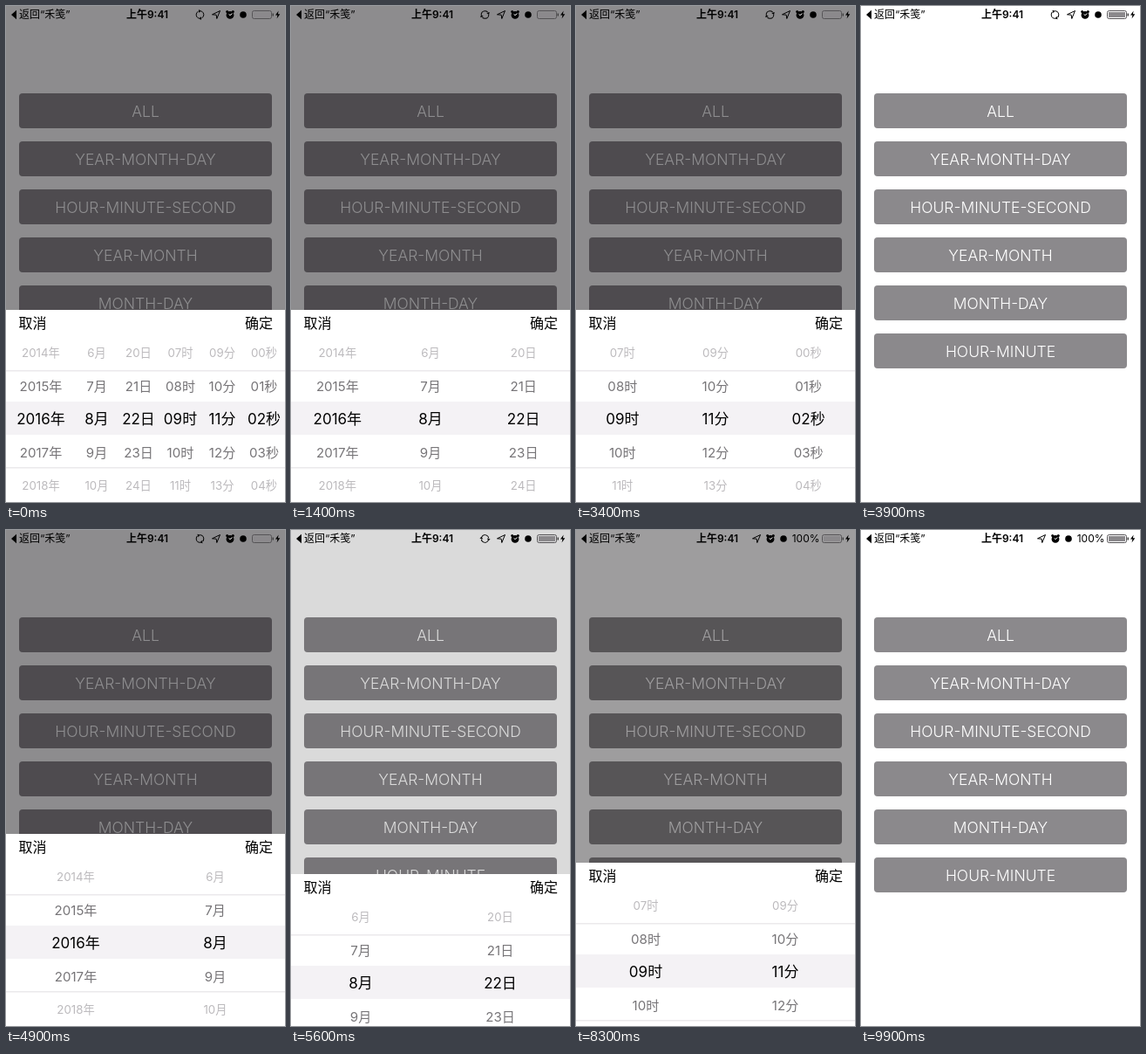
These frames come from a looping animation (320x568 px, 10 s). An HTML page with a canvas:

```html
<!DOCTYPE html>
<html lang="zh-CN">
<head>
<meta charset="utf-8">
<title>Date picker</title>
<style>
  html, body { margin: 0; width: 100%; height: 100%; overflow: hidden; background: #fff; }
  canvas { display: block; width: 320px; height: 568px; }
</style>
</head>
<body>
<canvas id="stage"></canvas>
<script>
const W = 320, H = 568, LOOP = 10000, STEP = 100;
const SHEET_TOP = 348, SHEET_H = H - SHEET_TOP, ROW_H = 38;
const GRAY = '#8b898c', PALE = '#f4f2f5';
const FONT = 'Inter, "Noto Sans CJK SC", "Noto Sans CJK", "Noto Sans", sans-serif';
const LABELS = ['ALL', 'YEAR-MONTH-DAY', 'HOUR-MINUTE-SECOND', 'YEAR-MONTH', 'MONTH-DAY', 'HOUR-MINUTE'];
const NOW = { 年: 2016, 月: 8, 日: 22, 时: 9, 分: 11, 秒: 2 };
const OPEN_MS = 350, CLOSE_MS = 450, DIM_LAG = 93, DIM_MS = 300;
const STATUS_SWAP = 6500;

const pickers = [
  { units: '年月日时分秒', open: -1000, close: 60 },
  { units: '年月日', open: 700, close: 2124 },
  { units: '时分秒', open: 2750, close: 3400 },
  { units: '年月', open: 4010, close: 4950 },
  { units: '月日', open: 5410, close: 5820 },
  { units: '时分', open: 6807, close: 8190 }
];

const canvas = document.getElementById('stage');
const ctx = canvas.getContext('2d');
const dpr = window.devicePixelRatio || 1;
canvas.width = W * dpr;
canvas.height = H * dpr;

const clamp = p => Math.min(1, Math.max(0, p));
const easeOut = p => 1 - (1 - p) ** 2;
const easeInOut = p => p * p * (3 - 2 * p);

function text(str, x, y, size, color, align = 'center', weight = 400) {
  ctx.font = `${weight} ${size}px ${FONT}`;
  ctx.textAlign = align;
  ctx.fillStyle = color;
  ctx.fillText(str, x, y + size * 0.365);
}

function rect(x, y, w, h, color) {
  ctx.fillStyle = color;
  ctx.fillRect(x, y, w, h);
}

function roundRect(x, y, w, h, r) {
  ctx.beginPath();
  ctx.roundRect(x, y, w, h, r);
}

function poly(...pts) {
  ctx.beginPath();
  for (let i = 0; i < pts.length; i += 2) ctx.lineTo(pts[i], pts[i + 1]);
  ctx.closePath();
}

function dot(x, y, r) {
  ctx.beginPath();
  ctx.arc(x, y, r, 0, Math.PI * 2);
  ctx.fill();
}

function drawButtons() {
  LABELS.forEach((label, i) => {
    const y = 100 + i * 55;
    roundRect(15, y, 290, 40, 4);
    ctx.fillStyle = GRAY;
    ctx.fill();
    text(label, 160, y + 20.5, 17.5, '#fff', 'center', 300);
  });
}

function drawSync(t) {
  ctx.save();
  ctx.translate(222.5, 10);
  ctx.rotate(Math.PI * (t - 2500) / 1000);
  for (let i = 0; i < 2; i++) {
    ctx.beginPath();
    ctx.arc(0, 0, 4.3, Math.PI * 1.08, Math.PI * 1.85);
    ctx.stroke();
    poly(2.2, -1.3, 6, -1.3, 4.3, 1.3);
    ctx.fill();
    ctx.rotate(Math.PI);
  }
  ctx.restore();
}

function drawAlarm(x) {
  dot(x - 3.3, 6.6, 1.5);
  dot(x + 3.3, 6.6, 1.5);
  dot(x, 10.4, 4.4);
  ctx.strokeStyle = '#fff';
  ctx.beginPath();
  ctx.moveTo(x + 2.4, 8.6);
  ctx.lineTo(x, 10.6);
  ctx.lineTo(x - 1.4, 9.4);
  ctx.stroke();
  ctx.strokeStyle = '#000';
}

function drawStatus(t) {
  const swapped = t >= STATUS_SWAP;
  const shift = swapped ? -34 : 0;
  ctx.fillStyle = ctx.strokeStyle = '#000';
  ctx.lineWidth = 1;
  poly(6, 10, 12, 4.8, 12, 15.2);
  ctx.fill();
  if (!swapped) drawSync(t);

  poly(245.5 + shift, 5.5, 236.5 + shift, 9.8, 241.2 + shift, 10.2, 241.8 + shift, 14.5);
  ctx.stroke();
  drawAlarm(257 + shift);
  dot(272 + shift, 10, 3.8);

  roundRect(282.5, 5.5, 22, 9, 2);
  ctx.strokeStyle = '#555356';
  ctx.stroke();
  rect(284, 7, 19, 6, GRAY);
  rect(305.5, 8.5, 1.5, 3, '#444');
  poly(312.6, 5.5, 309, 10.6, 311.4, 10.6, 310.6, 14.5, 314.3, 9.2, 311.9, 9.2);
  ctx.fillStyle = '#000';
  ctx.fill();

  text('返回“禾笺”', 15, 10, 12, '#000', 'left');
  text('上午9:41', 162, 10, 12, '#000', 'center', 600);
  if (swapped) text('100%', 279.5, 10, 12, '#000', 'right');
}

function columnCenters(n) {
  if (n === 6) return [40, 104, 152, 200, 248, 296];
  return Array.from({ length: n }, (_, i) => W * (i + 0.5) / n);
}

function cellText(unit, offset) {
  const value = String(NOW[unit] + offset);
  return ('时分秒'.includes(unit) ? value.padStart(2, '0') : value) + unit;
}

function drawSheet(units, drop) {
  const sizes = [17, 15.1, 13.3], colors = ['#000', '#777578', '#bcbabd'];
  const centers = columnCenters(units.length);
  ctx.save();
  ctx.translate(0, Math.round(drop));
  rect(0, SHEET_TOP, W, SHEET_H, '#fff');
  rect(0, 453, W, 38, PALE);
  rect(0, 417, W, 1.5, '#ebe9ec');
  rect(0, 528, W, 1.5, '#ebe9ec');
  text('取消', 14.5, 363, 16, '#000', 'left');
  text('确定', 306, 363, 16, '#000', 'right');
  [...units].forEach((unit, c) => {
    for (let i = -2; i <= 2; i++) {
      const k = Math.abs(i);
      text(cellText(unit, i), centers[c], 473 + i * ROW_H, sizes[k], colors[k]);
    }
  });
  ctx.restore();
}

function pickerState(p, t) {
  if (t >= p.close) {
    const e = 1 - easeInOut(clamp((t - p.close) / CLOSE_MS));
    return { shown: e, dim: e };
  }
  return {
    shown: easeOut(clamp((t - p.open) / OPEN_MS)),
    dim: clamp((t - p.open - DIM_LAG) / DIM_MS)
  };
}

function draw(t) {
  ctx.setTransform(dpr, 0, 0, dpr, 0, 0);
  rect(0, 0, W, H, '#fff');
  drawButtons();
  const active = pickers.find(p => t >= p.open && t < p.close + CLOSE_MS);
  if (active) {
    const { shown, dim } = pickerState(active, t);
    rect(0, 0, W, H, `rgba(3, 0, 5, ${0.45 * dim})`);
    drawSheet(active.units, SHEET_H * (1 - shown));
  }
  drawStatus(t);
}

// The picture advances in 100 ms ticks and holds still once.
function tick() {
  let t = Math.floor(performance.now() % LOOP / STEP) * STEP;
  if (t > 1400 && t < 1900) t = 1400;
  draw(t);
  requestAnimationFrame(tick);
}
tick();
</script>
</body>
</html>
```
